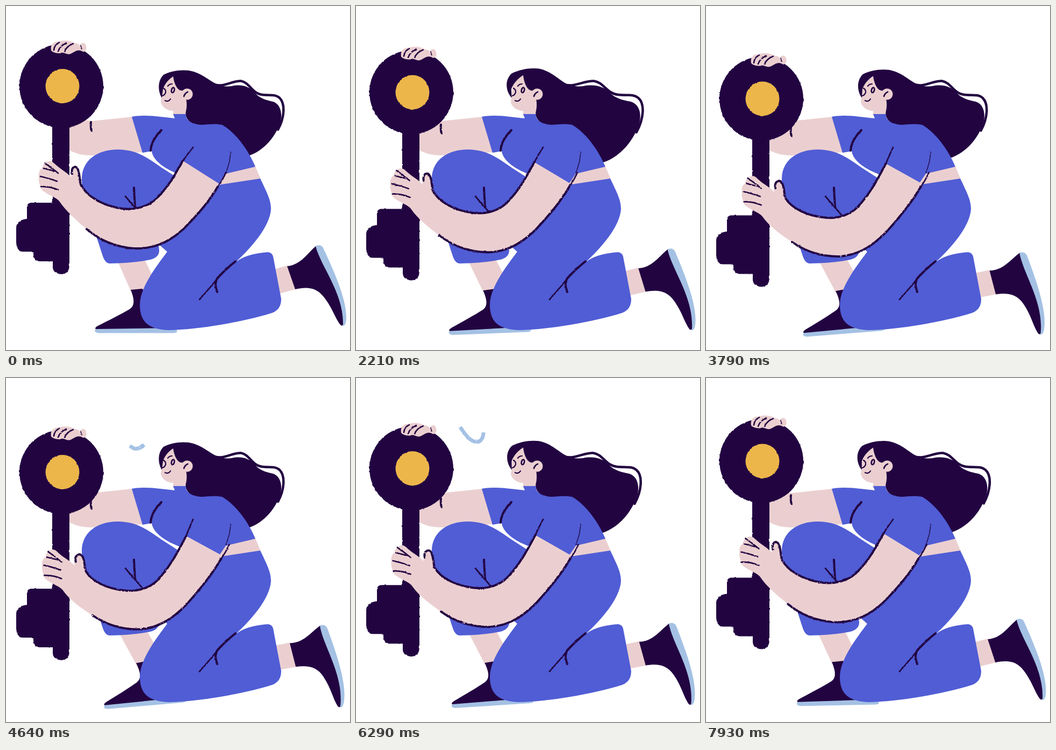
Recreate the animation shown at these times as an HTML page. Size 640x640 px, loop 8 s.

```html
<!DOCTYPE html>
<html lang="en">
<head>
<meta charset="utf-8">
<title>Woman with a key</title>
<style>
  html, body { margin: 0; width: 100%; height: 100%; overflow: hidden; background: #fff; }
  svg { display: block; width: 100vw; height: 100vh; }
  .dark { fill: #220441; }
  .blue { fill: #505dd5; }
  .skin { fill: #ebcfd0; }
  .sky { fill: #a4c1e4; }
  .line { fill: none; stroke: #220441; stroke-width: 4; stroke-linecap: round; stroke-linejoin: round; }
  .thin { stroke-width: 2.7; }
  .fine { stroke-width: 1.4; }
  .strand { stroke-width: 4.5; }
  .rough { filter: url(#rough); }
  .dry { filter: url(#dry); }
</style>
</head>
<body>
<svg viewBox="0 0 640 640">
  <defs>
    <filter id="rough" filterUnits="userSpaceOnUse" x="0" y="0" width="640" height="640" color-interpolation-filters="sRGB">
      <feTurbulence type="fractalNoise" baseFrequency=".13" numOctaves="2" seed="4"/>
      <feDisplacementMap in="SourceGraphic" scale="2.6" xChannelSelector="R" yChannelSelector="G"/>
    </filter>
    <filter id="dry" filterUnits="userSpaceOnUse" x="0" y="0" width="640" height="640" color-interpolation-filters="sRGB">
      <feTurbulence type="fractalNoise" baseFrequency=".22" numOctaves="2" seed="9" result="grain"/>
      <feDisplacementMap in="SourceGraphic" in2="grain" scale="2.4" xChannelSelector="R" yChannelSelector="G" result="edge"/>
      <feColorMatrix in="grain" values="0 0 0 0 0  0 0 0 0 0  0 0 0 0 0  0 0 10 0 -2.2"/>
      <feComposite in="edge" operator="in"/>
    </filter>
  </defs>

  <!-- back arm -->
  <path class="skin" d="M236 206L160 214L110 206V264C128 275 142 278 160 278L256 272Z"/>
  <g id="armCrease" class="dry"><path class="line" d="M158 216Q157 224 159 232"/></g>

  <!-- key with the upper hand -->
  <g id="key">
    <g class="rough">
      <circle class="dark" cx="103" cy="149" r="78"/>
      <path class="dark" d="M86 215V366H46Q38 367 39 378V396Q20 398 19 412V440Q20 457 32 457H51Q50 474 62 475H87V488Q90 499 104 499Q118 497 118 482V215Z"/>
      <ellipse cx="105" cy="149" rx="31.5" ry="32" fill="#ecb64a"/>
    </g>
    <path class="skin" d="M84 83C82 72 88 66 98 66C108 63 120 64 128 69Q136 70 138 74C139 67 148 67 149 74C151 80 148 86 143 85C133 79 129 85 120 89C113 92 107 84 101 88C94 88 88 87 84 83Z"/>
    <g class="dry">
      <path class="line thin" d="M99 68Q90 72 89 82M112 69Q101 74 97 84M125 70Q114 74 109 84"/>
      <path class="line fine" d="M139 73L141 80"/>
    </g>
  </g>

  <!-- front foot -->
  <g id="frontFoot">
    <path class="skin" d="M196 448L232 530L256 528L274 506L247 448Z"/>
    <path class="sky" d="M168 600L290 596L318 603Q320 608 312 608.500H172Q161 606 168 600Z"/>
    <path class="dark" d="M232 528L253 526L300 560V599L167 601Q164 599 171 595C191 585 213 574 230 564C241 557 238 543 232 528Z"/>
  </g>
  <path class="blue" d="M141 322C141 287 170 267 208 267C245 267 267 285 290 301L318 319L340 400L300 457L284 443L285 456Q284 468 268 472Q240 478 192 479Q185 478 181 468C167 425 156 392 150 368C144 350 141 338 141 322Z"/>

  <!-- back foot and kneeling leg -->
  <g id="backFoot">
    <path class="skin" d="M485 494L523 483L539 527L490 540Z"/>
    <path class="sky" d="M575 447Q585 442 590 450C607 486 634 545 633 580Q633 596 626 595Z"/>
    <path class="dark" d="M523 484C548 482 560 461 576 447C586 485 628 534 627 592Q626 597 622 593C612 580 607 561 591 541C577 523 560 522 538 527Z"/>
  </g>
  <path class="skin" d="M388 334L404 311L464 299L474 322Z"/>
  <path class="blue" d="M397 332.500L473 321C487 350 493 362 493 378C491 410 457 449 428 476C445 463 470 459 488 458Q495 459 497 466L512 545Q512 565 495 571C440 588 360 602 302 603C262 601 249 585 249 555C250 520 285 478 300 457L284 443L335 340Z"/>
  <g class="dry">
    <path class="line" d="M427 475Q408 490 392 508M391 511Q388 520 393 532"/>
    <path class="line thin" d="M394 506Q380 524 360 546"/>
    <path class="line" d="M238 338L240 374"/>
    <path class="line thin" d="M222 354L253 390"/>
  </g>

  <!-- head -->
  <path class="skin" d="M291 150L300 130L325 128L345 155L335 204H311L311 195C299 195 289 187 288 178L290 165Z"/>
  <path class="dark" data-warp="hair" d="M290 171C283 160 281 140 293 128C305 121 325 118 340 120C365 124 378 140 396 147C405 150 412 150 420 149C440 144 455 152 462 160C472 173 485 175 497 178C511 183 514 200 511 214C502 245 477 271 450 279L400 250L352 221C338 216 332 205 335 195C337 185 336 178 335 172L330 157C320 160 313 146 311 131C300 138 294 148 292 155L290 171Z"/>
  <path class="line strand" data-warp="hair" d="M388 146C405 152 420 139 437 139.500C453 142 458 163 476 165C490 167 500 163 509 171C520 182 518 208 506 230"/>
  <circle class="skin" cx="337" cy="164" r="10.500"/>
  <g class="line thin">
    <path d="M331 168Q333 162 338 160"/>
    <path stroke-width="2.2" d="M296 176Q302 179 306 173M301 149Q304 145 309 145M293 153Q298 156 297 161Q295 166 291 167"/>
    <ellipse cx="310.500" cy="156.500" rx="2.600" ry="4.800" transform="rotate(15 310.500 156.500)"/>
  </g>

  <!-- shirt -->
  <path class="blue" d="M234 206C262 201 290 207 314 209L311 201H335C333 209 341 217 352 219C365 224 380 217 402 221C431 238 453 273 464 299L409 312L396 331L330 325L324 314C300 305 274 290 271 270L254 273Z"/>
  <g class="dry">
    <path class="line" d="M289 231C280 240 270 253 269 269"/>
  </g>

  <!-- front arm -->
  <path class="skin" data-warp="arm" d="M329 288L397 331C378 365 352 393 330 415C300 443 270 452 238 451C200 448 172 434 150 415C130 398 112 382 99 363C92 354 64 347 64 336C62 330 60 325 61 318C60 308 64 304 67 302C69 290 82 284 90 293C100 303 115 310 121 319C120 308 122 299 129 299C137 302 136 318 139 332C150 354 178 369 205 375C235 382 265 375 283 355C303 335 313 316 329 288Z"/>
  <g class="dry">
    <path class="line" data-warp="arm" d="M123 312C121 303 125 299 129 299C137 302 136 318 139 332C150 354 178 369 205 375C235 382 265 375 283 355C303 335 313 316 329 288"/>
    <path class="line thin" data-warp="arm" d="M328 290Q337 276 348 263"/>
    <path class="line" data-warp="arm" d="M150 415C172 434 200 448 238 451C270 452 300 443 330 415C352 393 378 365 394 336"/>
    <path class="line thin" data-warp="arm" d="M394 336Q403 324 409 310"/>
    <path class="line fine" d="M409 310Q416 294 418 272"/>
    <path class="line thin" data-warp="arm" d="M72 292Q84 300 97 311M70 302Q80 305 90 307M64 317Q78 320 95 326M65 336Q80 335 97 342"/>
  </g>

  <!-- flying squiggle -->
  <g class="dry">
    <path id="squiggle" pathLength="100" fill="none" stroke="#a4c1e4" stroke-width="7" d="M257 124C249 132 242 133 236 130C223 124 220 106 223 98C227 88 235 88 237 97C238 106 235 117 226 119C212 119 202 104 195 93Q188 82 185 71"/>
  </g>
</svg>
<script>
  const LOOP = 8000, FPS = 14, BREATH = 9260, START = 75;
  const byId = id => document.getElementById(id);
  const clamp = v => Math.min(1, Math.max(0, v));
  const wave = (t, period) => (1 - Math.cos(2 * Math.PI * (t - START) / period)) / 2;
  const smooth = (t, from, to) => {
    const u = clamp((t - from) / (to - from));
    return u * u * (3 - 2 * u);
  };

  // Offset of a point at full movement.
  const fields = {
    hair(x, y) {
      const back = Math.max(0, (x - 400) / 116);
      const front = clamp((305 - x) / 21) * clamp((172 - y) / 20);
      const down = 13 * clamp((y - 200) / 77) * clamp((x - 400) / 50);
      const up = 3.5 * clamp((150 - y) / 30) * clamp((420 - x) / 60);
      return [17.5 * back - 6 * front, down - up];
    },
    arm(x, y) {
      const bend = Math.max(0, 1 - ((x - 205) / 85) ** 2);
      const free = clamp((y - 263) / 22);
      return [(6 + 8 * bend) * free, 30 * clamp(1 - (x - 110) / 270) * free];
    }
  };

  const soft = [...document.querySelectorAll('[data-warp]')].map(node => ({
    node, path: node.getAttribute('d'), kind: node.dataset.warp
  }));

  const warp = (path, field, amount) =>
    path.replace(/([\d.]+) ([\d.]+)/g, (_, x, y) => {
      const [dx, dy] = field(+x, +y);
      return `${(+x + dx * amount).toFixed(2)} ${(+y + dy * amount).toFixed(2)}`;
    });

  const place = (id, transform) => byId(id).setAttribute('transform', transform);

  function draw(now) {
    const t = Math.floor(now % LOOP * FPS / 1000 + 0.1) * 1000 / FPS;
    const lift = wave(t, BREATH);
    const amount = { arm: lift * 1.04, hair: wave(t, BREATH / 2) };

    place('key', `translate(0 ${26 * lift})`);
    place('armCrease', `translate(0 ${11 * lift})`);
    place('frontFoot', `rotate(${-5 * lift} 265 415)`);
    place('backFoot', `rotate(${5 * lift} 420 545)`);
    for (const { node, path, kind } of soft)
      node.setAttribute('d', warp(path, fields[kind], amount[kind]));

    const head = 100 * smooth(t, 3790, 7000);
    const tail = 100 * smooth(t, 4900, 7700);
    const squiggle = byId('squiggle').style;
    squiggle.visibility = head - tail > 0.5 ? 'visible' : 'hidden';
    squiggle.strokeDasharray = `${Math.max(0, head - tail)} 300`;
    squiggle.strokeDashoffset = -tail;
  }

  const begin = performance.now();
  function tick() {
    draw(performance.now() - begin);
    requestAnimationFrame(tick);
  }
  tick();
</script>
</body>
</html>
```
